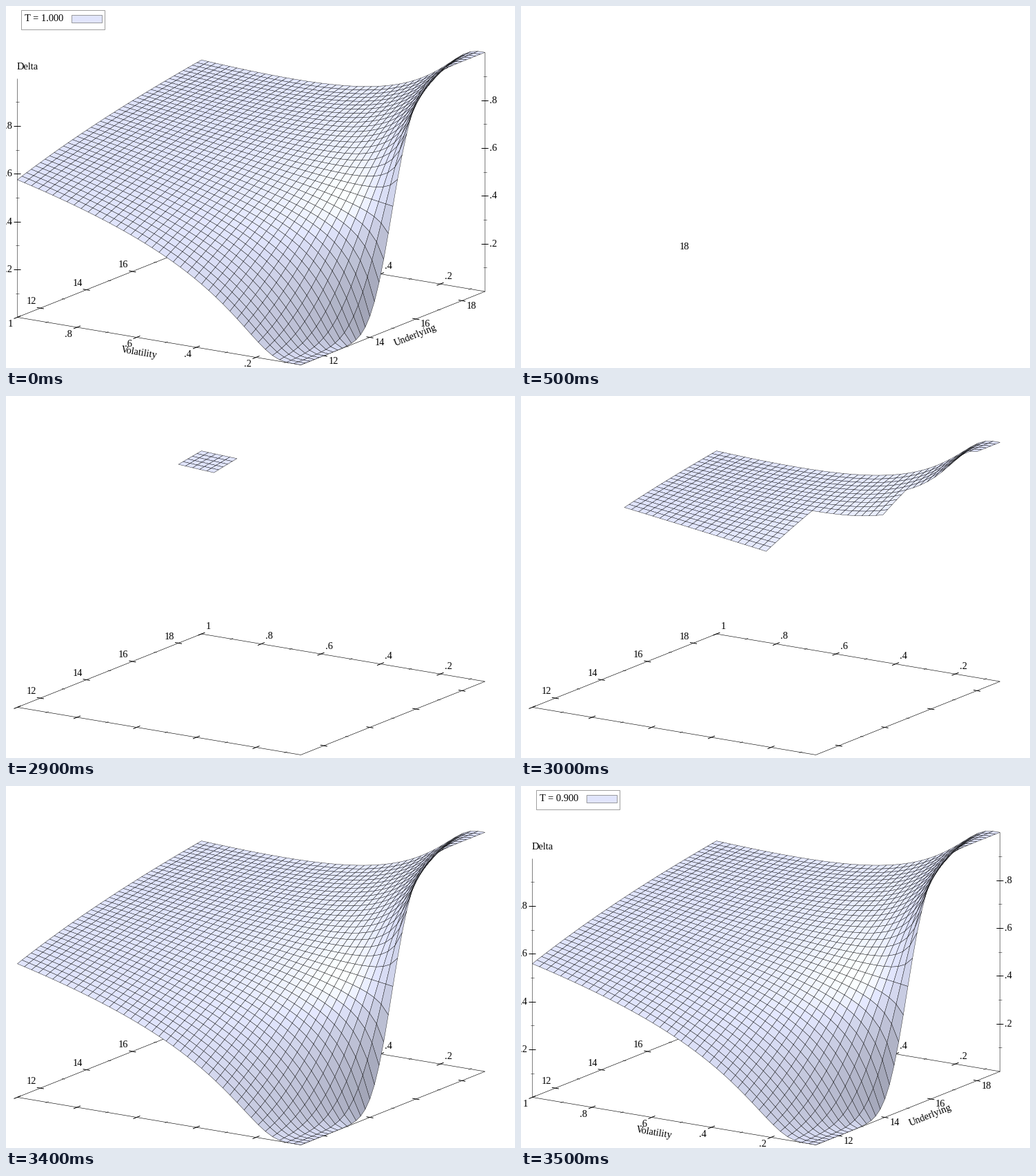
Write a matplotlib script that moves like this. It is 738 by 525 pixels and loops after 8000 ms.

```python
import math
import numpy as np
import matplotlib.pyplot as plt
from matplotlib.animation import FuncAnimation
from matplotlib.collections import LineCollection, PolyCollection
from matplotlib.patches import Rectangle

W, H, DPI = 738, 525, 72
STEP, LOOP = 100, 8000
N = 40                                   # cells per side
STRIKE, S_MIN, S_MAX = 15, 11, 19
V_MIN, V_MAX = 0.05, 1.0

# Orthographic view: screen vectors of the box edges
ORIGIN = np.array([16.45, 451.45])
VOL = np.array([411.0, 69.0])
UND = np.array([267.0, -106.4])
UP = np.array([0.0, -346.8])
SIDE, HEIGHT = 490.0, 358.7              # true edge lengths

BASE_RGB = np.array([226, 230, 255])
HALF = np.array([0.18, -0.62, 0.764])
LIGHT = np.array([-0.2, -0.45, 0.87])

plt.rcParams["font.family"] = "Liberation Serif"
plt.rcParams["font.size"] = 14.4
fig = plt.figure(figsize=(W / DPI, H / DPI), dpi=DPI, facecolor="white")
ax = fig.add_axes([0, 0, 1, 1])
ax.set_xlim(0, W)
ax.set_ylim(H, 0)
ax.axis("off")


def project(vol, und, z=0.0):
    a = (V_MAX - vol) / (V_MAX - V_MIN)
    b = (und - S_MIN) / (S_MAX - S_MIN)
    return ORIGIN + a * VOL + b * UND + z * UP


def delta(vol, und, t):
    sd = vol * math.sqrt(t)
    d1 = np.log(und / STRIKE) / sd + sd / 2
    return 0.5 * (1 + np.vectorize(math.erf)(d1 / math.sqrt(2)))


def shade(z):
    """Flat Phong colour of each cell, z indexed [u, s]."""
    k = HEIGHT * N / SIDE / 2
    zu = k * (z[1:, 1:] + z[1:, :-1] - z[:-1, 1:] - z[:-1, :-1])
    zs = k * (z[1:, 1:] + z[:-1, 1:] - z[1:, :-1] - z[:-1, :-1])
    n = np.stack([-zu, -zs, np.ones_like(zu)], axis=-1)
    n /= np.linalg.norm(n, axis=-1, keepdims=True)
    diffuse = 0.593 + 0.44 * np.clip(n @ LIGHT, 0, 1)
    spec = np.clip(n @ HALF, 0, 1) ** 25
    rgb = BASE_RGB * diffuse[..., None] + 28 * spec[..., None]
    return np.clip(rgb / 255, 0, 1)


def surface(t, regions):
    """Mesh cells inside the (u0, u1, s0, s1) regions, back to front."""
    vol = np.linspace(V_MAX, V_MIN, N + 1)
    und = np.linspace(S_MIN, S_MAX, N + 1)
    z = delta(vol[:, None], und[None, :], t)
    p = project(vol[:, None, None], und[None, :, None], z[..., None])
    rgb = shade(z)
    quads, colors = [], []
    for s in reversed(range(N)):
        for u in range(N):
            if any(a <= u < b and c <= s < d for a, b, c, d in regions):
                quads.append([p[u, s], p[u + 1, s], p[u + 1, s + 1], p[u, s + 1]])
                colors.append(rgb[u, s])
    return ax.add_collection(PolyCollection(
        quads, facecolors=colors, edgecolors="black", linewidths=0.4, zorder=2))


def lines(segs, width, z):
    return ax.add_collection(
        LineCollection(segs, colors="black", linewidths=width, zorder=z))


def label(x, y, s, ha="left", z=3):
    """Text whose digits are centred on y."""
    return ax.text(x, y + 4.8, s, ha=ha, va="baseline", zorder=z)


def ticks(major, minor, along, z):
    d = np.array(along) / max(along, key=abs)
    return [lines([(p - r * d, p + r * d) for p in pts], width, z)
            for pts, r, width in ((major, 5, 1.0), (minor, 2.3, 0.5))]


def num(v):
    return "1" if v > 0.95 else f".{round(v * 10)}"


def box(x, y, w, h, fill, z):
    return ax.add_patch(Rectangle((x, y), w, h, fc=fill, ec="#777777", lw=0.7, zorder=z))


# Floor frame, its ticks and the labels behind the surface
corners = [project(v, s) for v, s in
           [(V_MAX, S_MIN), (V_MAX, S_MAX), (V_MIN, S_MAX), (V_MIN, S_MIN)]]
floor = [lines([corners + corners[:1]], 0.6, 1)]
vols, mid_vols = np.arange(10, 0, -2) / 10, np.arange(9, 0, -2) / 10
unds, mid_unds = range(12, 19, 2), range(13, 18, 2)
for und in (S_MIN, S_MAX):
    floor += ticks([project(v, und) for v in vols],
                   [project(v, und) for v in mid_vols], UND, 1)
for vol in (V_MAX, V_MIN):
    floor += ticks([project(vol, s) for s in unds],
                   [project(vol, s) for s in mid_unds], VOL, 1)

front = []
for v in vols:
    x, y = project(v, S_MAX)
    floor.append(label(x + 6.4, y - 12, num(v), z=1))
    x, y = project(v, S_MIN)
    front.append(label(x - 6.7, y + 8.8, num(v), "right"))
for s in unds:
    x, y = project(V_MAX, s)
    back_num = label(x - 6, y - 10.5, str(s), "right", z=1)
    floor.append(back_num)
    x, y = project(V_MIN, s)
    front.append(label(x + 6.6, y + 6.7, str(s)))

# Upright axes
for vol, und, dx, ha in ((V_MAX, S_MIN, -7.5, "right"), (V_MIN, S_MAX, 6.6, "left")):
    front.append(lines([(project(vol, und), project(vol, und, 1))], 0.5, 3))
    front += ticks([project(vol, und, h) for h in vols[1:]],
                   [project(vol, und, h) for h in mid_vols], (1.0, 0.0), 3)
    for h in vols[1:]:
        x, y = project(vol, und, h)
        front.append(label(x + dx, y - 0.8, num(h), ha))

# Axis names and legend
front.append(label(15.8, 87.5, "Delta"))
for x, y, s, d in ((193, 502.8, "Volatility", VOL), (593.5, 477.8, "Underlying", UND)):
    angle = -math.degrees(math.atan2(d[1], d[0]))
    front.append(ax.text(x, y, s, ha="center", va="center", rotation=angle,
                         rotation_mode="anchor", zorder=3))
legend = label(27, 17, "", z=4)
front += [box(22, 6, 121, 28, "white", 3), box(95, 13, 44, 11, "#e1e5fc", 4), legend]

ALL = [(0, N, 0, N)]
full_old = surface(1.0, ALL)
corner = surface(0.9, [(0, 5, 35, 40)])
rear = surface(0.9, [(0, 20, 20, 40), (20, 30, 30, 40), (30, 40, 35, 40)])
most = surface(0.9, [(0, 40, 20, 40), (0, 20, 10, 20), (0, 10, 0, 10),
                     (10, 13, 8, 10), (10, 11, 7, 8)])
full_new = surface(0.9, ALL)

# Start time, visible artists, time to expiry
STAGES = [
    (0, floor + [full_old] + front, 1.0),
    (500, [back_num], 1.0),
    (600, floor, 1.0),
    (2900, floor + [corner], 0.9),
    (3000, floor + [rear], 0.9),
    (3200, floor + [most], 0.9),
    (3400, floor + [full_new], 0.9),
    (3500, floor + [full_new] + front, 0.9),
]
EVERY = floor + front + [full_old, corner, rear, most, full_new]


def draw(i):
    _, shown, t = [st for st in STAGES if st[0] <= i * STEP][-1]
    for a in EVERY:
        a.set_visible(False)
    for a in shown:
        a.set_visible(True)
    legend.set_text(f"T = {t:.3f}")
    return EVERY


anim = FuncAnimation(fig, draw, frames=LOOP // STEP, interval=STEP,
                     init_func=lambda: draw(0), repeat=True, blit=False)
plt.show()
```
